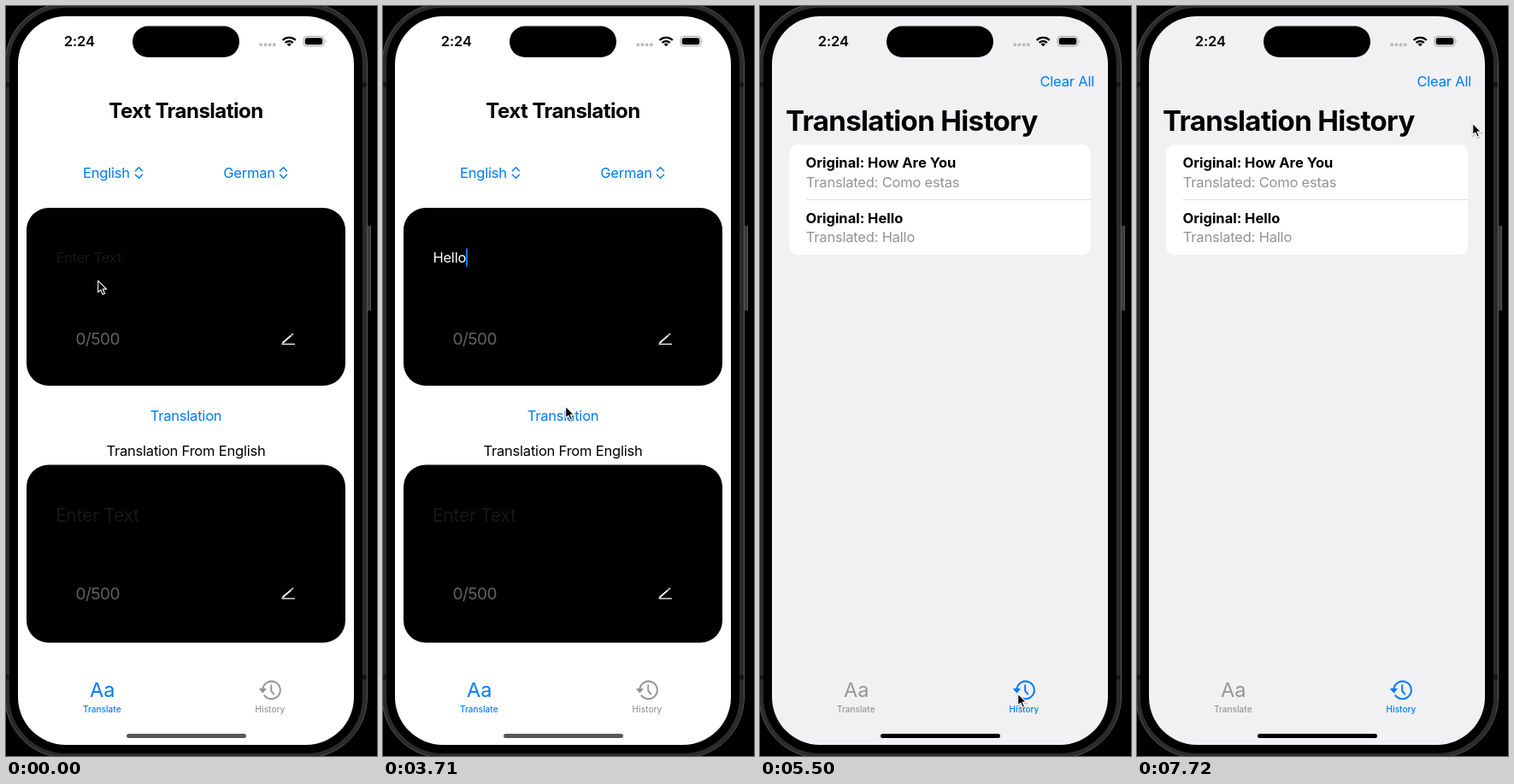
Recreate the animation shown at these times as an HTML page. Size 434x877 px, loop 8 s.

```html
<!DOCTYPE html>
<html lang="en">
<head>
<meta charset="utf-8">
<title>Text Translation</title>
<style>
  html, body { margin: 0; width: 100%; height: 100%; overflow: hidden; background: #000; }
  svg { display: block; width: 100vw; height: 100vh; }
  text { font: 400 16.5px Inter, "Liberation Sans", sans-serif; font-optical-sizing: none; letter-spacing: -.2px; fill: currentColor; white-space: pre; }
  .mid { text-anchor: middle; }
  .bold { font-weight: 700; letter-spacing: 0; }
  .title { font-weight: 700; font-size: 24px; letter-spacing: -.5px; }
  .large { font-weight: 700; font-size: 33px; letter-spacing: -.65px; }
  .out { font-size: 21px; letter-spacing: -.25px; }
  .count { font-size: 19px; letter-spacing: -.5px; fill: #636366; }
  .tab { font-weight: 500; font-size: 10px; letter-spacing: .05px; text-anchor: middle; }
  .aa { font-size: 23.5px; letter-spacing: 0; text-anchor: middle; }
  .time { font-weight: 600; font-size: 16.5px; letter-spacing: -.1px; text-anchor: middle; }
  .blue { color: #007aff; }
  .hint { color: #171719; }
  .gray { color: #939396; }
  .line { fill: none; stroke: currentColor; stroke-linecap: round; stroke-linejoin: round; }
</style>
</head>
<body>
<svg viewBox="0 0 434 877" preserveAspectRatio="none">
  <defs>
    <path id="updown" class="line" stroke-width="1.5" d="M-4 -2.2L0 -6.2L4 -2.2M-4 2.2L0 6.2L4 2.2"/>
    <g id="pencil">
      <path class="line" stroke-width="1.3" d="M1 12.3H15.5"/>
      <path class="line" stroke-width="1.9" d="M3 9.7L11.2 2.6"/>
      <path class="line" stroke-width="1.9" d="M12.9 1.1L13.3 .8"/>
      <path fill="currentColor" d="M.6 12L2 8.7L4 10.8Z"/>
    </g>
    <path id="arrow" d="M.7 1.2V14.8L3.9 11.9L6.2 17.2L8.5 16.2L6.2 11.1H10.5Z"/>
  </defs>

  <!-- phone body -->
  <rect width="434" height="877"/>
  <rect x="421" y="257" width="6" height="99" rx="1" fill="#3a3a3a"/>
  <path d="M426.5 257V356" stroke="#555"/>
  <rect x="1.5" y="-.5" width="418" height="877" rx="69" fill="none" stroke="#2b2b2b" stroke-width="5"/>
  <rect x="-1" y="-3" width="423.5" height="882" rx="71" fill="none" stroke="#565656"/>
  <path d="M0 92H4M0 785H4M417 92H422M417 785H422" stroke="#151515" stroke-width="5"/>
  <rect id="screen" x="14" y="12" width="393" height="852" rx="56"/>

  <!-- translate screen -->
  <g id="home">
    <text class="title mid" x="210.5" y="131">Text Translation</text>
    <g class="blue">
      <text class="mid" x="117.5" y="201">English</text>
      <use href="#updown" x="155.4" y="195"/>
      <text class="mid" x="284.5" y="201">German</text>
      <use href="#updown" x="324.5" y="195"/>
      <text id="button" class="mid" x="210.5" y="484.5">Translation</text>
    </g>
    <text class="mid" x="210.5" y="526">Translation From English</text>
    <rect x="24" y="236" width="373" height="208" rx="26"/>
    <rect x="24" y="536.5" width="373" height="208" rx="26"/>
    <text id="input" x="58.4" y="300"></text>
    <rect id="caret" y="283.5" width="2" height="21" fill="#0a7aff"/>
    <text id="output" class="out" x="58" y="603"></text>
    <text class="count" x="81.5" y="396">0/500</text>
    <text class="count" x="81.5" y="693.5">0/500</text>
    <g color="#fff">
      <use href="#pencil" x="322" y="383"/>
      <use href="#pencil" x="322" y="680.5"/>
    </g>
  </g>

  <!-- history screen -->
  <g id="history">
    <text class="blue" x="391" y="94" text-anchor="end">Clear All</text>
    <text class="large" x="30" y="146">Translation History</text>
    <rect x="34" y="162" width="353" height="129" rx="10" fill="#fff"/>
    <path d="M54 226.5H387" stroke="#dcdcdf"/>
    <text class="bold" x="53.5" y="189">Original: How Are You</text>
    <text class="gray" x="53.8" y="211.5">Translated: Como estas</text>
    <text class="bold" x="53.5" y="253.5">Original: Hello</text>
    <text class="gray" x="53.8" y="276">Translated: Hallo</text>
  </g>

  <!-- status bar -->
  <rect x="148" y="23.5" width="125" height="36.5" rx="18.2"/>
  <text class="time" x="85.8" y="47">2:24</text>
  <path d="M298.2 45.3H314" stroke="#bdbdc0" stroke-width="4" stroke-linecap="round" stroke-dasharray="0 5.2"/>
  <g fill="none" stroke="#000" stroke-width="2.4">
    <path d="M323.6 40A10.8 10.8 0 0 1 338.8 40"/>
    <path d="M326.6 43A6.5 6.5 0 0 1 335.8 43"/>
  </g>
  <path d="M331.2 47.3L328.6 44.7A3.8 3.8 0 0 1 333.8 44.7Z"/>
  <rect x="348" y="35.5" width="24" height="11.5" rx="3.6" fill="none" stroke="#a2a2a5"/>
  <rect x="349.7" y="37.2" width="20.6" height="8.1" rx="2.3"/>
  <path d="M373.6 39.3Q375.3 41.2 373.6 43.2Z" fill="#a2a2a5"/>

  <!-- tab bar -->
  <g id="tabA">
    <text class="aa" x="112.7" y="808">Aa</text>
    <text class="tab" x="112.3" y="826">Translate</text>
  </g>
  <g id="tabB">
    <path class="line" stroke-width="2" d="M302.3 806.2A10.3 10.3 0 1 0 300.4 798"/>
    <path class="line" stroke-width="1.9" d="M310.2 794.3V801L313.4 804.6"/>
    <path fill="currentColor" d="M296.6 798H304.2Q305 798 304.5 798.8L301 803Q300.4 803.6 299.8 803L296.2 798.8Q295.8 798 296.6 798Z"/>
    <text class="tab" x="309" y="826">History</text>
  </g>
  <rect id="bar" x="141" y="851" width="140" height="5" rx="2.5"/>

  <g id="cursor">
    <use href="#arrow" y="1.2" fill="none" stroke="#000" stroke-opacity=".2" stroke-width="2"/>
    <use href="#arrow" stroke="#fff" stroke-width="1.1" stroke-linejoin="round"/>
  </g>
</svg>
<script>
  const $ = id => document.getElementById(id);
  const LOOP = 8000, TICK = 148.5;
  const WORD = 'Hello';
  const CARET_X = [59, 70, 80, 83.6, 87.4, 97];
  const TYPED_AT = [14, 15, 16, 17, 19];
  const HISTORY_AT = 37, RESULT_AT = 28;

  // pointer path: tick, x, y
  const PATH = [
    [0, 107, 320], [1, 108, 317], [2, 110, 306], [3, 111, 301],
    [21, 111, 301], [22, 122, 319], [23, 170, 398], [24, 205, 454], [25, 213, 467],
    [29, 213, 467], [30, 217, 482], [31, 231, 538], [33, 269, 682], [35, 298, 791], [36, 301, 803],
    [38, 301, 803], [39, 295, 800], [41, 255, 788], [43, 197, 781], [45, 108, 791], [46, 98, 793],
    [47, 99, 791], [48, 192, 563], [49, 318, 303], [50, 372, 200], [51, 388, 150], [52, 392, 136]
  ];

  function pointer(k) {
    const i = PATH.findIndex(p => p[0] >= k);
    if (i < 0) return PATH[PATH.length - 1].slice(1);
    if (i === 0) return PATH[0].slice(1);
    const [a, ax, ay] = PATH[i - 1], [b, bx, by] = PATH[i];
    const u = (k - a) / (b - a);
    return [ax + (bx - ax) * u, ay + (by - ay) * u];
  }

  const within = (k, a, b) => k >= a && k < b;
  const show = (id, on) => $(id).setAttribute('display', on ? 'inline' : 'none');

  function label(id, value) {
    const el = $(id);
    el.textContent = value || 'Enter Text';
    el.style.color = value ? '#fff' : '#171719';
  }

  function draw(ms) {
    const k = Math.floor((ms % LOOP + 5) / TICK);
    const past = k >= HISTORY_AT;
    const typed = TYPED_AT.filter(t => k >= t).length;

    show('home', !past);
    show('history', past);
    $('screen').setAttribute('fill', past ? '#f1f1f4' : '#fff');
    $('bar').setAttribute('fill', past ? '#000' : '#58585a');
    $('tabA').style.color = past ? '#969699' : '#007aff';
    $('tabB').style.color = past ? '#007aff' : '#969699';

    label('input', WORD.slice(0, typed));
    label('output', k >= RESULT_AT ? 'Hallo' : '');
    show('caret', within(k, 6, 11) || within(k, 13, RESULT_AT));
    $('caret').setAttribute('x', CARET_X[typed]);
    $('button').setAttribute('opacity', within(k, 26, 28) ? .3 : 1);

    const [x, y] = pointer(k);
    $('cursor').setAttribute('transform', `translate(${x} ${y})`);
  }

  const start = performance.now();
  function loop() {
    draw(performance.now() - start);
    requestAnimationFrame(loop);
  }
  loop();
</script>
</body>
</html>
```
